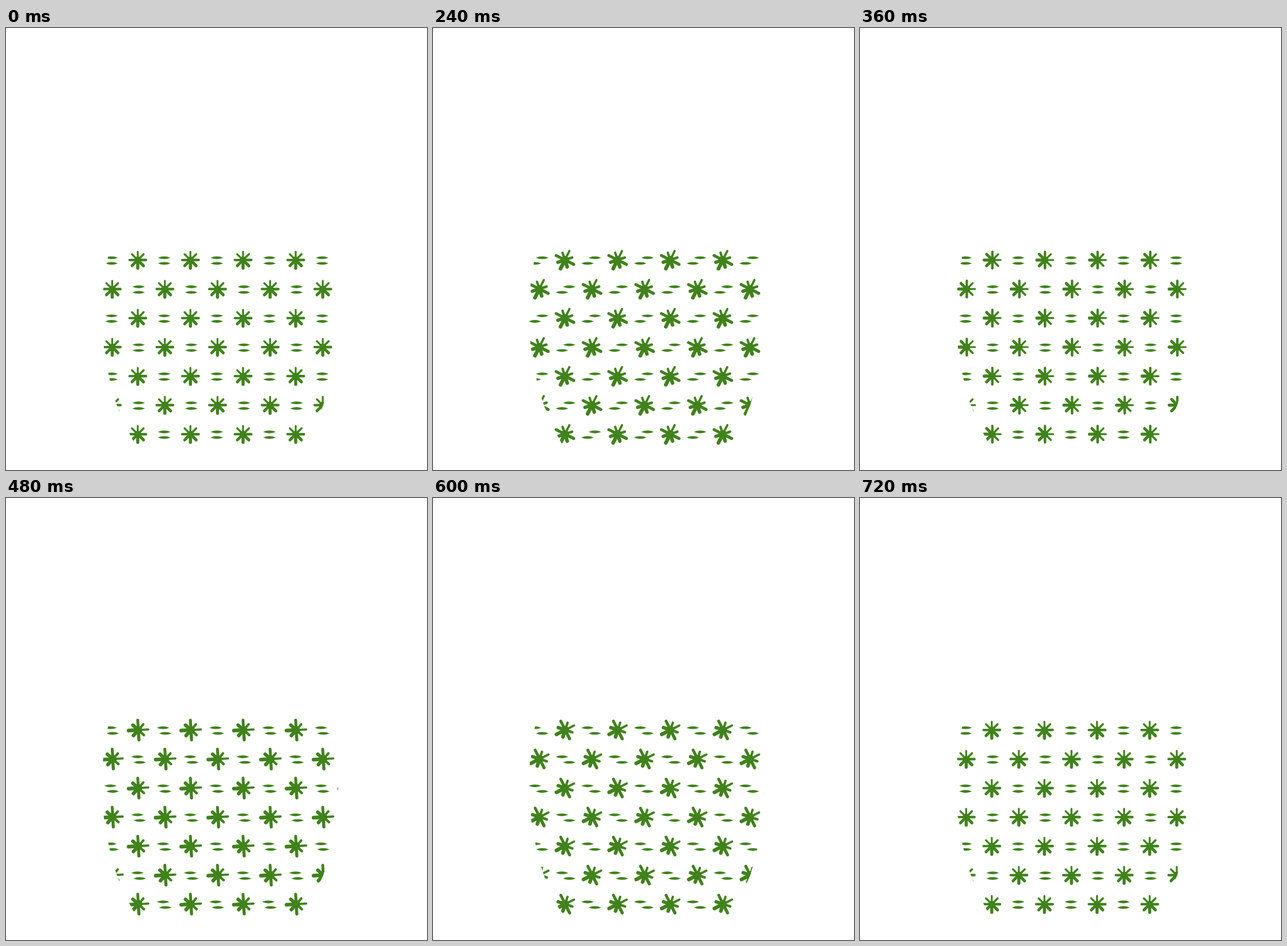
Animation of 731 by 766 pixels, one loop 750 ms. Source, as an HTML page with a canvas:

```html
<!DOCTYPE html>
<html lang="en">
<head>
<meta charset="utf-8">
<title>Leaf pattern</title>
<style>
html, body { margin: 0; width: 100%; height: 100%; overflow: hidden; background: #fff; }
canvas { display: block; }
</style>
</head>
<body>
<canvas id="stage" width="731" height="766"></canvas>
<script>
const ctx = document.getElementById('stage').getContext('2d');
const WIDTH = 731, HEIGHT = 766;
const STEP = 30, STEPS = 25, HALF = 12;
const GAP_X = 91.4, GAP_Y = 50.3, TOP = 402.6, MIDDLE = 371.5;
const HEAVY_SIDE = 1.4; // direction of the thickest arms

// Left edge of the pot; everything to its right is inside
const edge = new Path2D(`M181 378 C173 412 166.3 455 166.3 500
  C166.3 550 178 612 193 655 Q207 692 229 730 H${WIDTH} V378 Z`);

const cubicIn = p => p ** 3;

function clipToPot() {
  for (let side = 0; side < 2; side++) {
    ctx.clip(edge);
    ctx.transform(-1, 0, 0, 1, 2 * MIDDLE, 0);
  }
}

function star(x, y, angle, pulse) {
  ctx.save();
  ctx.translate(x, y);
  ctx.rotate(angle);
  ctx.translate(-0.5, -0.5);
  for (let i = 0; i < 8; i++) {
    const a = i * Math.PI / 4;
    const weight = Math.cos(a - HEAVY_SIDE);
    const width = (4.3 + 1.1 * weight) * (1 + 0.3 * pulse);
    const length = (16.4 + 0.4 * weight) * (i % 2 ? 1 - 0.08 * pulse : 1 + 0.3 * pulse);
    const reach = length - width / 2;
    ctx.lineWidth = width;
    ctx.beginPath();
    ctx.moveTo(0, 0);
    ctx.lineTo(reach * Math.cos(a), reach * Math.sin(a));
    ctx.stroke();
  }
  ctx.beginPath();
  ctx.arc(0, 0, 6 + 1.2 * pulse, 0, 2 * Math.PI);
  ctx.fill();
  ctx.restore();
}

function dash(x, y) {
  ctx.beginPath();
  ctx.moveTo(x - 11, y);
  ctx.quadraticCurveTo(x, y - 4.8, x + 11, y);
  ctx.quadraticCurveTo(x, y + 4.8, x - 11, y);
  ctx.fill();
}

function draw(now) {
  const step = Math.floor(now / STEP) % STEPS;
  const back = step >= HALF && step < 2 * HALF;
  const p = step % HALF / HALF;
  const pulse = 1 - Math.abs(2 * p - 1);
  const turn = back ? 1 - cubicIn(p) : cubicIn(p);
  const swing = p < 0.5 ? cubicIn(2 * p) : 1 - cubicIn(2 * p - 1);
  const shift = (back ? -6.6 : 6.6) * swing;

  ctx.clearRect(0, 0, WIDTH, HEIGHT);
  ctx.save();
  clipToPot();
  ctx.fillStyle = ctx.strokeStyle = '#40821b';
  ctx.lineCap = 'round';
  for (let row = 0; row < 7; row++) {
    const y = TOP + row * GAP_Y;
    const starX = row % 2 ? 184.9 : 229.3;
    const dashX = row % 2 ? 230.3 : 183.3;
    for (let col = -1; col < 6; col++) {
      star(starX + col * GAP_X, y, turn * Math.PI / 2, pulse);
      const x = dashX + col * GAP_X;
      dash(x + shift, y - 4.4);
      dash(x - shift, y + 5.3);
    }
  }
  ctx.restore();
}

function loop() {
  draw(performance.now());
  requestAnimationFrame(loop);
}
loop();
</script>
</body>
</html>
```
